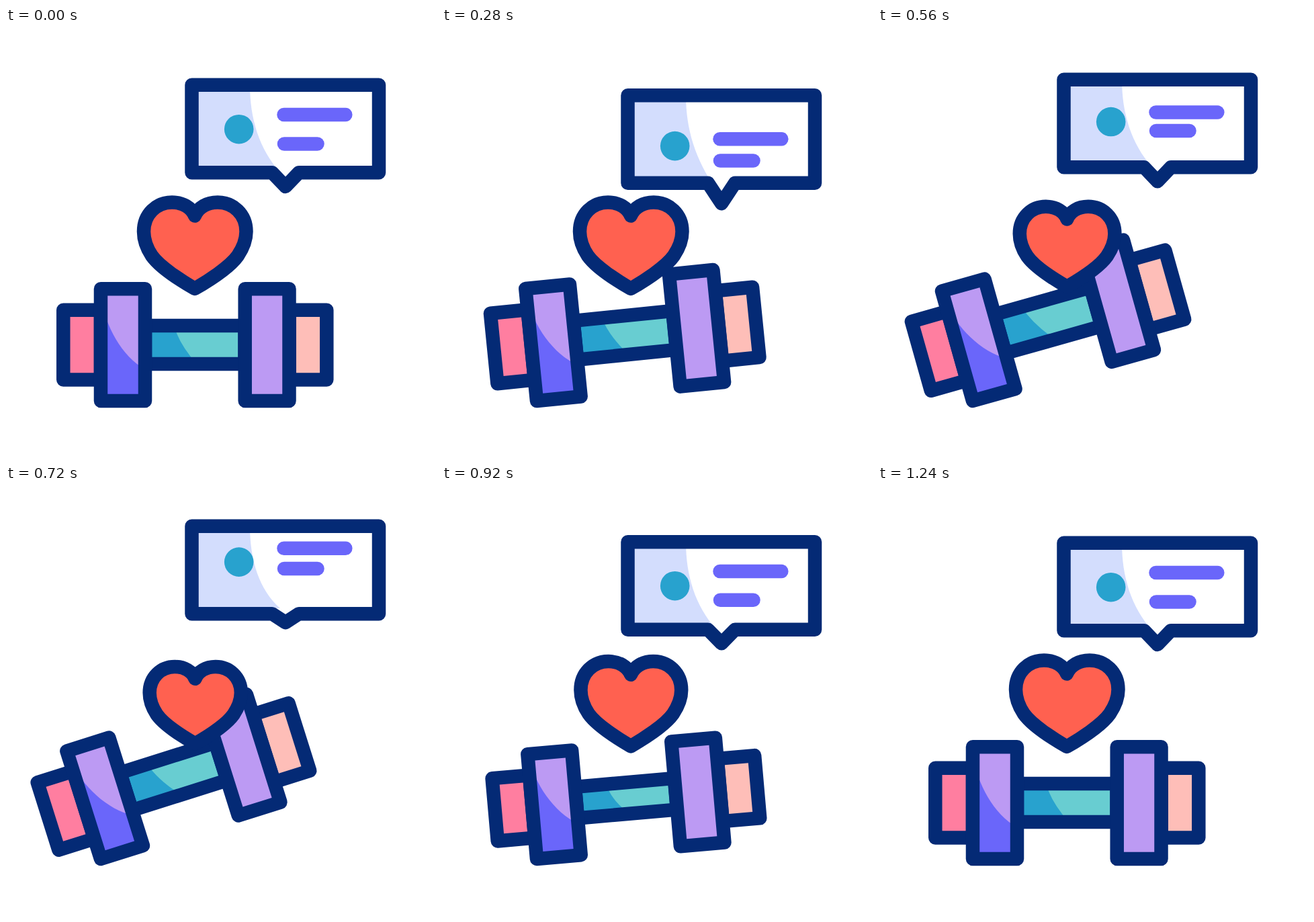
Recreate the animation shown at these times as an HTML page. Size 640 by 640 pixels, loop 1480 ms.

```html
<!DOCTYPE html>
<html lang="en">
<head>
<meta charset="utf-8">
<title>Dumbbell, heart and message</title>
<style>
  html, body { margin: 0; width: 100%; height: 100%; overflow: hidden; background: #fff; }
  svg { display: block; width: 100vw; height: 100vh; }
  .line { fill: none; stroke: #042a75; stroke-width: 20.5; stroke-linejoin: round; }
  .text { stroke: #6a66fa; stroke-width: 20.5; stroke-linecap: round; }
</style>
</head>
<body>
<svg viewBox="0 0 640 640">
  <g id="dumbbell">
    <path id="leftEnd" class="line" style="fill:#ff7ea0"/>
    <path id="rightEnd" class="line" style="fill:#febeb8"/>
    <path id="bar" fill="#68cdd1"/>
    <path id="barShade" fill="#28a2ce"/>
    <path id="barLine" class="line"/>
    <path id="leftPlate" fill="#bc9af3"/>
    <path fill="#6a66fa" d="M141 400C148 444 172 488 207 508V555H141Z"/>
    <path id="leftLine" class="line"/>
    <path id="rightPlate" class="line" style="fill:#bc9af3"/>
  </g>
  <path id="heart" class="line" style="fill:#ff6150"
    d="M281 279.5C276 267 263 259.5 247 259.5C224 259.5 205 277 205 303C205 318 211 330 217 339C229 356 262 377 281 388C300 377 333 356 345 339C351 330 357.5 318 357.5 303C357.5 277 338 259.5 315 259.5C299 259.5 286 267 281 279.5Z"/>
  <g id="bubble">
    <path id="paper" fill="#fff"/>
    <path id="paperShade" fill="#d3ddfd"/>
    <path id="paperLine" class="line"/>
  </g>
  <circle id="dot" cx="346.7" cy="150.7" r="21.8" fill="#28a2ce"/>
  <path id="text1" class="text" d="M413.5 129H505.3"/>
  <path id="text2" class="text" d="M414 172.5H463.5"/>
</svg>
<script>
  const LOOP = 1480, STEP = 40;
  const $ = id => document.getElementById(id);
  const set = (id, name, value) => $(id).setAttribute(name, value);

  function bezier(x1, y1, x2, y2) {
    const at = (a, b, u) => 3 * (1 - u) * (1 - u) * u * a + 3 * (1 - u) * u * u * b + u * u * u;
    return x => {
      let lo = 0, hi = 1;
      for (let i = 0; i < 24; i++) {
        const mid = (lo + hi) / 2;
        if (at(x1, x2, mid) < x) lo = mid; else hi = mid;
      }
      return at(y1, y2, (lo + hi) / 2);
    };
  }

  const linear = x => x;
  const settle = bezier(.167, .167, .68, 1);
  const swing = bezier(.24, 0, .8, 1);
  const quadOut = x => 1 - (1 - x) * (1 - x);

  // keys: [time, value, easing towards this key]
  function track(t, keys) {
    if (t <= keys[0][0]) return keys[0][1];
    for (let i = 1; i < keys.length; i++) {
      const [t0, v0] = keys[i - 1], [t1, v1, ease] = keys[i];
      if (t <= t1) return v0 + (v1 - v0) * ease((t - t0) / (t1 - t0));
    }
    return keys[keys.length - 1][1];
  }

  const hop = (t, down, up) =>
    track(t, [[120, 0], [400, down, settle], [680, up, swing], [960, 0, settle]]);

  const box = (l, t, r, b) => `M${l} ${t}H${r}V${b}H${l}Z`;
  const moveY = (id, y) => set(id, 'transform', `translate(0 ${y})`);

  function drawDumbbell(t) {
    const angle = track(t, [[120, 0], [680, -20, linear], [1000, 0, linear]]);
    // shift of every upper edge: stretch on the way up, squash on landing
    const s = track(t, [[120, 0], [680, -4, linear], [1000, 15, linear], [1200, 0, quadOut]]);
    const endTop = 419.7 + s, barTop = 443 + s, plateTop = 388.3 + s;
    const bar = box(207, barTop, 355.5, 500);
    const left = box(141, plateTop, 207, 555);

    set('dumbbell', 'transform', `rotate(${angle} 141 555)`);
    set('leftEnd', 'd', box(85.3, endTop, 141, 523.5));
    set('rightEnd', 'd', box(421.7, endTop, 477.3, 523.5));
    set('bar', 'd', bar);
    set('barLine', 'd', bar);
    set('barShade', 'd', `M207 ${barTop}H${250 + s * .4}Q258 ${471 + s / 2} 284 500H207Z`);
    set('leftPlate', 'd', left);
    set('leftLine', 'd', left);
    set('rightPlate', 'd', box(355.7, plateTop, 421.5, 555));
  }

  function drawHeart(t) {
    const k = track(t, [[400, 1], [680, .875, linear], [960, 1, linear]]);
    set('heart', 'transform', `translate(286 348) scale(${k}) translate(-286 -348)`);
    $('heart').style.strokeWidth = 20.5 / k;
  }

  function drawBubble(t) {
    const y = hop(t, 22, -30.3);
    const tail = hop(t, 35.5, -40) - y;
    const outline = `M276.5 84.7H555V215.2H436L416 ${236 + tail}L396 215.2H276.5Z`;
    moveY('bubble', y);
    set('paper', 'd', outline);
    set('paperLine', 'd', outline);
    set('paperShade', 'd', `M276.5 84.7H363C363 135 377 180 408 ${215 + tail}H276.5Z`);
    moveY('dot', hop(t, 35, -45.6));
    moveY('text1', hop(t, 51, -44));
    moveY('text2', hop(t, 35, -60));
  }

  const start = performance.now();
  function frame() {
    const elapsed = (performance.now() - start) % LOOP;
    const t = Math.floor(elapsed / STEP) * STEP;
    drawDumbbell(t);
    drawHeart(t);
    drawBubble(t);
    requestAnimationFrame(frame);
  }
  frame();
</script>
</body>
</html>
```
